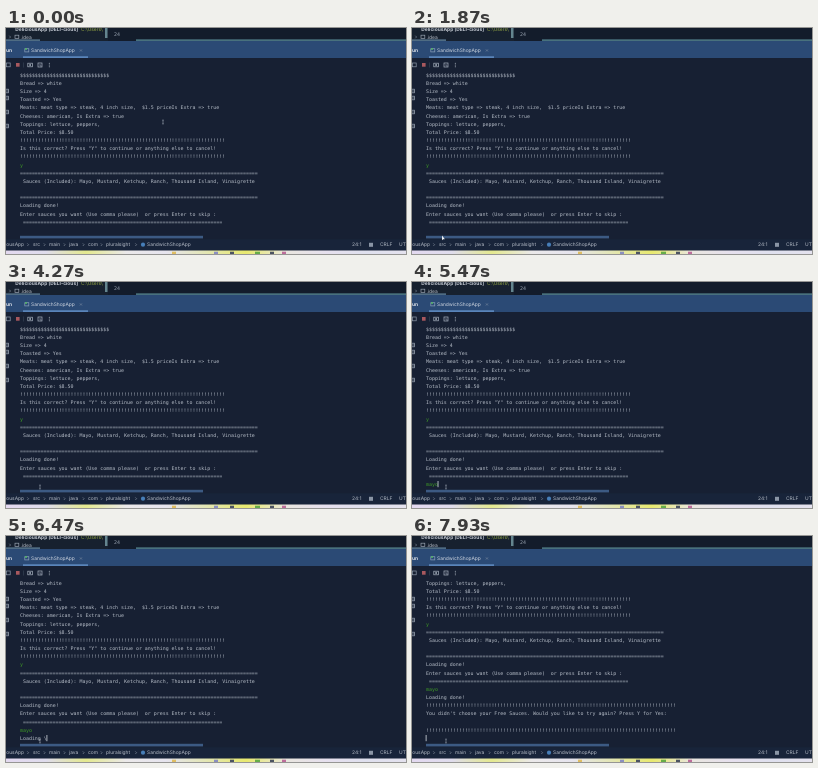
Recreate the animation shown at these times as an HTML page with a canvas. Size 400 by 226 pixels, loop 8 s.

```html
<!DOCTYPE html>
<html lang="en">
<head>
<meta charset="utf-8">
<title>Console order</title>
<style>
html, body { margin: 0; width: 100%; height: 100%; overflow: hidden; background: #172033; }
canvas { display: block; width: 400px; height: 226px; }
</style>
</head>
<body>
<canvas id="stage"></canvas>
<script>
const LOOP = 8000, ROW = 8.16, LEFT = 14, ADVANCE = 2.98;
const MONO = '4.95px "DejaVu Sans Mono", monospace';
const SANS = '4.9px Inter, sans-serif';
const ENTER = 5990, DONE = 6690, SPIN = 140;
const BACK = '#172033', GREY = '#b5bcc7', GREEN = '#3f9a26';

const canvas = document.getElementById('stage');
const ctx = canvas.getContext('2d');
const dpr = window.devicePixelRatio || 1;
canvas.width = 400 * dpr;
canvas.height = 226 * dpr;
ctx.scale(dpr, dpr);
ctx.textRendering = 'geometricPrecision';

const bangs = '!'.repeat(69), longBangs = '!'.repeat(84), rule = '='.repeat(80);
const order = [
  '$'.repeat(30),
  'Bread => white',
  'Size => 4',
  'Toasted => Yes',
  'Meats: meat type => steak, 4 inch size,  $1.5 priceIs Extra => true',
  'Cheeses: american, Is Extra => true',
  'Toppings: lettuce, peppers,',
  'Total Price: $8.50',
  bangs,
  'Is this correct? Press "Y" to continue or anything else to cancel!',
  bangs,
  'y',
  rule,
  ' Sauces (Included): Mayo, Mustard, Ketchup, Ranch, Thousand Island, Vinaigrette',
  '',
  rule,
  'Loading done!',
  'Enter sauces you want (Use comma please)  or press Enter to skip :',
  ' ' + '='.repeat(67)
];
const result = [
  'Loading done!',
  longBangs,
  "You didn't choose your Free Sauces. Would you like to try again? Press Y for Yes:",
  '',
  longBangs,
  ''
];

function rect(x, y, w, h, color) {
  ctx.fillStyle = color;
  ctx.fillRect(x, y, w, h);
}

function text(str, x, y, color = GREY, font = SANS, align = 'left') {
  ctx.font = font;
  ctx.textAlign = align;
  ctx.fillStyle = color;
  ctx.fillText(str, x, y);
}

function dot(x, y, r, color) {
  ctx.fillStyle = color;
  ctx.beginPath();
  ctx.arc(x, y, r, 0, 7);
  ctx.fill();
}

function stroke(points, color, width = 0.7) {
  ctx.strokeStyle = color;
  ctx.lineWidth = width;
  ctx.beginPath();
  points.forEach(([x, y]) => ctx.lineTo(x, y));
  ctx.stroke();
}

function box(x, y, w, h, color) {
  ctx.strokeStyle = color;
  ctx.lineWidth = 0.7;
  ctx.strokeRect(x, y, w, h);
}

function chevron(x, y) {
  stroke([[x - 0.7, y - 1.3], [x + 0.6, y], [x - 0.7, y + 1.3]], '#8f99a8', 0.6);
}

function drawTop() {
  rect(0, 0, 400, 13, '#131c2b');
  rect(0, 0, 102, 13, '#17212f');
  text('DeliciousApp [DELI-cious]', 72, 2.9, '#c3c9d2', 'bold 4.9px Inter, sans-serif', 'right');
  text('C:\\Users\\', 75, 2.9, '#93a542');
  chevron(4, 9);
  box(9, 7.2, 3.8, 3.2, '#98a2b0');
  text('.idea', 14.5, 10.5);
  rect(99, 0, 2.5, 10, '#64858f');
  text('24', 108, 8, '#9ba5b2', MONO);
  rect(0, 11.3, 34, 1.7, '#4f6c83');
  rect(130, 11.3, 270, 1.7, '#48717d');
}

function drawTabs() {
  rect(0, 13, 400, 17, '#2b4a75');
  text('un', 0, 24.3, '#d5dbe4', 'bold 5px Inter, sans-serif');
  box(18.8, 20.7, 4, 3.2, '#8ba0ba');
  dot(20, 21, 1, '#55b766');
  text('SandwichShopApp', 25, 24.2, '#d0d7e1');
  stroke([[73.9, 21.4], [76, 23.5]], '#8795a7', 0.5);
  stroke([[76, 21.4], [73.9, 23.5]], '#8795a7', 0.5);
  rect(17, 28.4, 65, 1.4, '#6593cb');
}

function drawToolbar() {
  box(0.5, 35, 3.7, 3.8, '#8e9aa9');
  rect(10, 35, 3.6, 3.7, '#a8585e');
  stroke([[17.5, 34.5], [17.5, 39.5]], '#344254');
  box(21.8, 35.2, 4.6, 3.6, '#a9b3c0');
  dot(24.1, 37, 0.9, '#a9b3c0');
  box(32, 35, 4, 4, '#a9b3c0');
  stroke([[34, 36], [34, 38], [35.5, 38]], '#a9b3c0', 0.5);
  [35.2, 37, 38.8].forEach(y => dot(43.3, y, 0.5, '#b5bdc9'));
}

function drawSide() {
  [63, 70, 84, 98].forEach(y => {
    box(-1, y - 1.8, 3.6, 3.6, '#a5afbd');
    stroke([[-1, y], [2.4, y]], '#a5afbd', 0.6);
  });
}

function drawStatus() {
  rect(14, 207.8, 183, 2.6, '#3c5a83');
  rect(0, 211.3, 400, 11.2, '#18243a');
  text('DeliciousApp', 18, 218.3, GREY, SANS, 'right');
  [['src', 27], ['main', 43], ['java', 63], ['com', 82], ['pluralsight', 100], ['SandwichShopApp', 141]]
    .forEach(([name, x]) => text(name, x, 218.3));
  [22, 38.5, 58.5, 77.5, 95.5, 130].forEach(x => chevron(x, 216.7));
  dot(137, 216.7, 2.1, '#477eb8');
  text('24:1', 346, 218.3);
  rect(363, 214.8, 4, 4, '#8a95a5');
  text('CRLF', 374, 218.3);
  text('UTF-8', 393, 218.3);

  const desk = ctx.createLinearGradient(0, 0, 400, 0);
  ['#e3d9f0', '#dfdcec', '#e4e98f', '#ebe9ea', '#e6e4ee', '#e3e6b4', '#e8e96f', '#e9e6df', '#e6e0ee', '#dfe0ee', '#e4e2ee']
    .forEach((color, i) => desk.addColorStop(i / 10, color));
  rect(0, 222.5, 400, 3.5, desk);
  [[166, 4, '#dfbd62'], [208, 4, '#8b8fc0'], [224, 4, '#4c5361'],
   [249, 5, '#66ad48'], [264, 4, '#4c5361'], [276, 4, '#bd6d9b']]
    .forEach(([x, w, color]) => rect(x, 223.7, w, 2.3, color));
}

function drawConsole(t) {
  const typed = 'mayo'.slice(0, [4400, 4630, 4850, 5080].filter(k => t >= k).length);
  const rows = [...order, typed];
  if (t >= DONE) rows.push(...result);
  else if (t >= ENTER) rows.push('Loading ' + '|/-\\'[Math.floor((t - ENTER) / SPIN) % 4]);

  const first = rows.length - 20;
  ctx.save();
  ctx.beginPath();
  ctx.rect(9, 43, 391, 164);
  ctx.clip();
  rows.slice(first).forEach((row, i) => {
    const input = i + first === 11 || i + first === 19;
    text(row, LEFT, 48.8 + i * ROW, input ? GREEN : GREY, MONO);
  });
  const focused = t > 2450 && t < DONE || t > 7000;
  if (focused && t % 1000 >= 450) {
    rect(LEFT + rows.at(-1).length * ADVANCE - 0.3, 199, 0.8, 6.2, '#d3d9e1');
  }
  ctx.restore();
}

function ease(t, from, to) {
  const p = Math.min(1, Math.max(0, (t - from) / (to - from)));
  return p * p * (3 - 2 * p);
}

function drawPointer(t) {
  const down = ease(t, 700, 1750), back = ease(t, 1900, 2150);
  const x = 157 - 127 * down + 4 * back;
  const y = 94 + 116 * down - 5 * back;
  if (y > 207) {
    ctx.fillStyle = '#eef1f5';
    ctx.beginPath();
    [[0, -2.5], [0, 2.3], [1.1, 1.3], [2.9, 1.2]].forEach(([dx, dy]) => ctx.lineTo(x + dx, y + dy));
    ctx.fill();
    return;
  }
  stroke([[x, y - 1.9], [x, y + 1.9]], '#b5bcc8', 0.5);
  [-1.9, 1.9].forEach(dy => stroke([[x - 0.8, y + dy], [x + 0.8, y + dy]], '#b5bcc8', 0.5));
}

function draw(now) {
  const t = now % LOOP;
  rect(0, 0, 400, 226, BACK);
  drawTop();
  drawTabs();
  drawToolbar();
  drawSide();
  drawConsole(t);
  drawStatus();
  drawPointer(t);
  requestAnimationFrame(draw);
}
requestAnimationFrame(draw);
</script>
</body>
</html>
```
